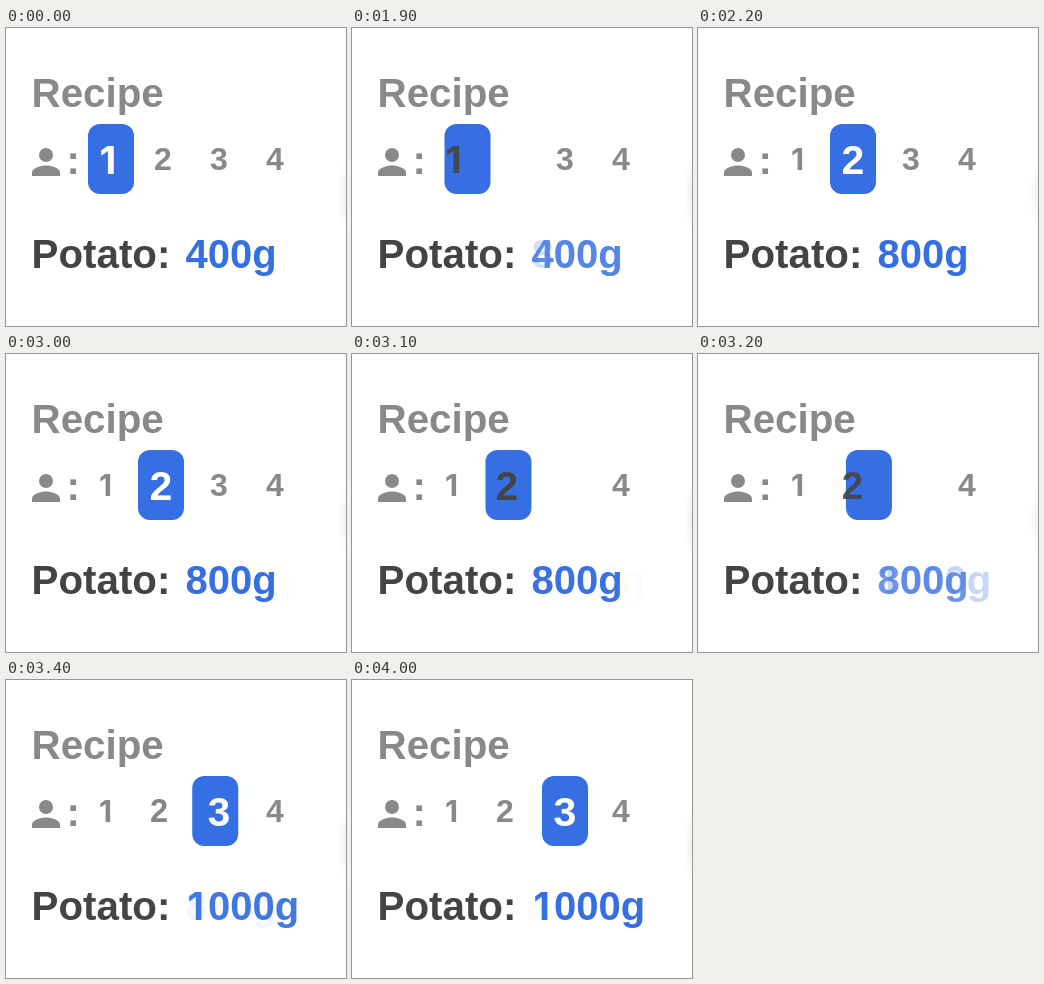
An HTML page that plays this animation: 340 px wide and 298 px high, repeating every 4.6 s.

```html
<!DOCTYPE html>
<html lang="en">
<head>
<meta charset="utf-8">
<title>Recipe</title>
<style>
  html, body { margin: 0; width: 100%; height: 100%; overflow: hidden; background: #fff; }
  svg { display: block; width: 340px; height: 298px; }
  text { font: bold 40.3px "Liberation Sans", Arial, sans-serif; fill: #444; }
  .one { font-family: Inter, Roboto, sans-serif; font-size: .95em; }
  .muted { fill-opacity: .63; }
  .amount text { font-size: 40px; fill: #366fe4; }
  .digit { text-anchor: middle; }
</style>
</head>
<body>
<svg viewBox="0 0 340 298">
  <defs>
    <radialGradient id="shade">
      <stop offset="0" stop-color="#000" stop-opacity=".1"/>
      <stop offset=".5" stop-color="#000" stop-opacity=".04"/>
      <stop offset="1" stop-color="#000" stop-opacity="0"/>
    </radialGradient>
  </defs>
  <ellipse cx="344" cy="166" rx="13" ry="42" fill="url(#shade)"/>
  <text class="muted" x="25.6" y="78.5">Recipe</text>
  <g fill="#444" class="muted">
    <circle cx="40" cy="127" r="7"/>
    <path d="M26 148v-3.5c0-4.7 9.3-7 14-7s14 2.3 14 7v3.5z"/>
  </g>
  <text class="muted" x="60.5" y="146">:</text>
  <rect id="pill" y="96" width="46" height="70" rx="12" fill="#366fe4"/>
  <g id="digits"></g>
  <text x="25.6" y="240">Potato:</text>
  <g class="amount">
    <text x="179.5" y="240">400g</text>
    <text x="179.5" y="240">800g</text>
    <text y="240"><tspan class="one" x="189.8" text-anchor="middle">1</tspan><tspan x="202">000g</tspan></text>
  </g>
</svg>
<script>
  const LOOP = 4600, TICK = 100, EASE_TIME = 400;
  const pillX = [82, 132, 190];
  // digit centres for each selected serving
  const centers = [
    [102, 157, 213, 269],
    [99.5, 155, 213, 269],
    [99.5, 153, 213, 269]
  ];
  const moves = [
    { start: 1782, shown: 1900 },
    { start: 3062, shown: 3100 }
  ];

  const pill = document.getElementById('pill');
  const amounts = [...document.querySelectorAll('.amount text')];
  const digits = [1, 2, 3, 4].map(n => {
    const el = document.createElementNS('http://www.w3.org/2000/svg', 'text');
    const span = document.createElementNS('http://www.w3.org/2000/svg', 'tspan');
    el.setAttribute('class', 'digit');
    if (n === 1) span.setAttribute('class', 'one');
    span.textContent = n;
    el.append(span);
    document.getElementById('digits').append(el);
    return el;
  });

  const mix = (a, b, p) => a + (b - a) * p;

  function progress(t, move) {
    if (t < move.shown) return 0;
    const x = Math.min(1, (t - move.start) / EASE_TIME);
    return x * x * (3 - 2 * x);
  }

  function draw(time) {
    const t = Math.floor((time % LOOP) / TICK) * TICK;
    const [first, second] = moves.map(m => progress(t, m));
    const from = second > 0 ? 1 : 0;
    const to = from + 1;
    const p = from ? second : first;
    const selected = p > 0 ? to : from;

    pill.setAttribute('x', mix(pillX[from], pillX[to], p));

    digits.forEach((el, i) => {
      const size = i === from ? 1 - p : i === to ? p : 0;
      el.setAttribute('x', mix(centers[from][i], centers[to][i], p));
      el.setAttribute('y', mix(142, 146, size));
      el.style.fontSize = mix(32, 41, size) + 'px';
      el.style.fill = i === selected ? '#fff' : '#444';
      el.style.fillOpacity = mix(.63, 1, size);
    });

    amounts.forEach((el, i) => {
      el.style.opacity = i === from ? 1 - p : i === to ? p : 0;
    });
  }

  const begin = performance.now();
  function frame() {
    draw(performance.now() - begin);
    requestAnimationFrame(frame);
  }
  frame();
</script>
</body>
</html>
```
